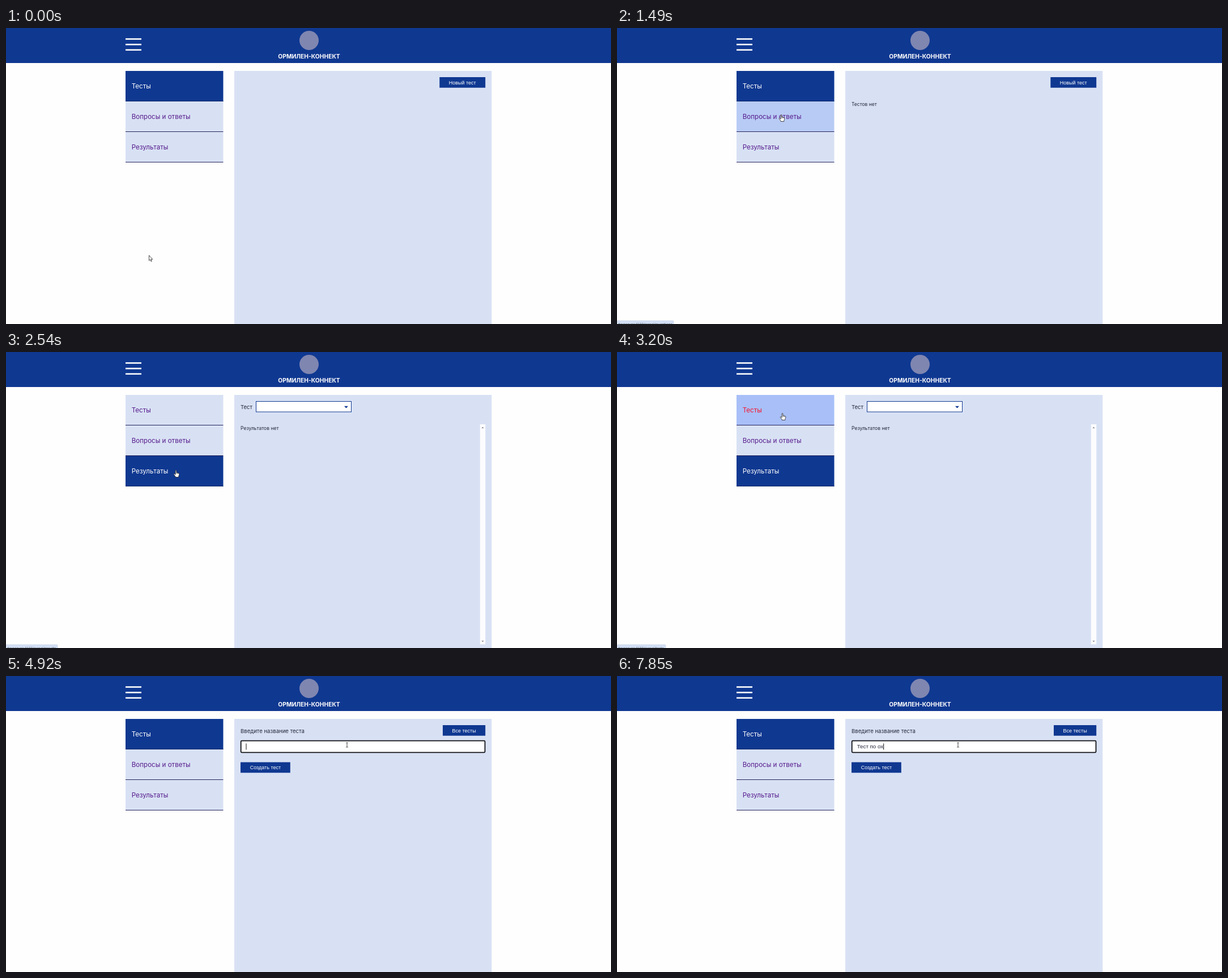
These frames come from a looping animation (1068 by 524 pixels, 8000 ms). An HTML page:

```html
<!DOCTYPE html>
<html lang="ru">
<head>
<meta charset="utf-8">
<title>Тесты</title>
<style>
  html, body { margin: 0; width: 100%; height: 100%; overflow: hidden; background: #fefefe; }
  svg { display: block; }
  text { font-family: Inter, "Open Sans", sans-serif; fill: #23253a; white-space: pre; }
  .ui { font-family: "Liberation Sans", Arial, sans-serif; }
</style>
</head>
<body>
<svg id="stage" width="1068" height="524" viewBox="0 0 1068 524"></svg>
<script>
const NAVY = '#0f3891', PALE = '#d8e1f4', HOVER = '#a8bff8', LINE = '#25235a';
const LOOP = 8000;
const MENU = ['Тесты', 'Вопросы и ответы', 'Результаты'];
const LINKS = [['tests', 86], ['questions', 100], ['results', 91]];
const PAGES = { tests: 0, questions: 1, results: 2, form: 0 };
const stage = document.getElementById('stage');

// time, page, pointer, pointer x, pointer y, details
const STEPS = [
  [0, 'tests', 'arrow', 252, 402, { loading: true }],
  [430, 'tests', 'arrow', 258, 378, { loading: true }],
  [640, 'tests', 'arrow', 276, 284, { loading: true }],
  [850, 'tests', 'hand', 289, 168, { loading: true, link: 1, tint: '#d0dbf4' }],
  [1070, 'tests', 'hand', 292, 110, { loading: true, link: 0 }],
  [1280, 'tests', 'hand', 292, 108, { link: 0 }],
  [1490, 'tests', 'hand', 290, 153, { link: 1, tint: '#b8cbf5' }],
  [1700, 'questions', 'hand', 291, 155, { link: 1 }],
  [1910, 'questions', 'hand', 300, 209, { link: 2, tint: '#d0dbf4' }],
  [2120, 'questions', 'hand', 300, 209, { link: 2, tint: HOVER }],
  [2540, 'results', 'hand', 300, 209, { link: 2 }],
  [2760, 'results', 'hand', 297, 165, { link: 1, tint: '#c6d4f5' }],
  [2980, 'results', 'hand', 293, 111, { link: 0, tint: '#c0d0f6' }],
  [3200, 'results', 'hand', 292, 108, { link: 0, tint: HOVER, pressed: true }],
  [3420, 'tests', 'hand', 292, 108, { link: 0 }],
  [3630, 'tests', 'arrow', 455, 84, {}],
  [3850, 'tests', 'arrow', 735, 62, {}],
  [4080, 'tests', 'hand', 819, 92, { buttonHot: true }],
  [4290, 'form', 'hand', 816, 93, { buttonHot: true }],
  [4500, 'form', 'beam', 602, 122, {}],
  [4710, 'form', 'beam', 602, 122, { focus: 1.3 }],
  [4920, 'form', 'beam', 602, 122, { focus: 1.8, caret: true }],
  [5350, 'form', 'beam', 602, 122, { focus: 1.8 }],
  ...[[5760, 1], [5970, 2], [6180, 3], [6390, 4], [6590, 5], [6790, 6], [6990, 8], [7420, 9], [7850, 10]]
    .map(([t, n]) => [t, 'form', 'beam', 602, 122,
      { focus: 1.8, caret: true, typed: 'Тест по ох'.slice(0, n) }])
];

const rect = (x, y, w, h, fill, more = '') =>
  `<rect x="${x}" y="${y}" width="${w}" height="${h}" fill="${fill}" ${more}/>`;
const path = (d, fill, more = '') => `<path d="${d}" fill="${fill}" ${more}/>`;
const text = (x, y, size, str, more = '') =>
  `<text x="${x}" y="${y}" font-size="${size}" ${more}>${str}</text>`;
const button = (x, y, w, str, hot) => rect(x, y, w, 18.7, hot ? '#2358b9' : NAVY) +
  text(x + w / 2, y + 12.5, 9, str, 'class="ui" text-anchor="middle" style="fill:#fff"');

const POINTERS = {
  arrow: path('M.5 .5V9.8L2.6 7.9 4 11.3 5.4 10.7 4 7.4H6.8Z', '#fff', 'stroke="#222" stroke-width=".8"'),
  hand: path('M-.9 1Q0 -.4.9 1V4.6L2.5 4.8 4 5.2 5.3 5.9Q6 6.2 5.8 8.2L4.8 10.5V12.5H-.9V11.4L-3.7 7.7Q-4 6.4-2.7 6.6L-.9 8.2Z',
    '#fff', 'stroke="#222" stroke-width=".8" stroke-linejoin="round"') +
    path('M.9 4.6V7M2.6 5V7M4.2 5.4V7', 'none', 'stroke="#222" stroke-width=".5"'),
  beam: path('M-2 -4H-.5L0 -3.5 .5 -4H2M0 -3.5V3.5M-2 4H-.5L0 3.5 .5 4H2', 'none', 'stroke="#333" stroke-width=".9"')
};

function header() {
  return rect(0, 0, 1068, 62, NAVY) +
    [18.2, 27.9, 37.5].map(y => rect(211, y, 28, 2.6, '#fff')).join('') +
    '<circle cx="535" cy="22" r="17" fill="#7f86b0"/>' +
    text(535, 54, 10.3, 'ОРМИЛЕН-КОННЕКТ', 'text-anchor="middle" font-weight="700" style="fill:#fff"');
}

function menu(active, { link, tint, pressed }) {
  return MENU.map((label, i) => {
    const y = 76 + 54 * i, on = i === active, hot = i === link;
    const ink = on ? '#fff' : hot && pressed ? '#f5142d' : '#551a8b';
    return rect(211, y, 172.5, 54, on ? NAVY : hot && tint || PALE) +
      rect(211, y + 53, 172.5, 1, on ? '#0c2669' : LINE) +
      text(221.7, y + 31, 11.6, label, `style="fill:${ink}"`);
  }).join('');
}

const select = () => text(414, 100.5, 9.6, 'Тест') +
  rect(441.5, 87.5, 168, 18.5, '#fff', `stroke="${NAVY}"`) +
  path('M597 95.7H604L600.5 99.5Z', NAVY);

const CONTENT = {
  tests: o => button(765.3, 87, 80.9, 'Новый тест', o.buttonHot) +
    (o.loading ? '' : text(414, 137.5, 8.5, 'Тестов нет')),
  questions: () => select() + button(753.5, 87.5, 92.7, 'Новый вопрос') +
    text(414, 129.8, 8.5, 'Вопросов нет'),
  results: () => select() + text(414, 138, 8.55, 'Результатов нет') +
    rect(836.8, 128, 9.4, 389.5, '#fcfcfe') +
    path('M839.4 135H843.6L841.5 132.5ZM839.4 511H843.6L841.5 513.5Z', '#8b8d94'),
  form: o => text(414, 100.5, 9.6, 'Введите название теста') +
    button(771, 87, 75.2, 'Все тесты', o.buttonHot) +
    rect(414.7, 114.7, 430.8, 20.6, '#fff',
      `rx="${o.focus ? 1.5 : 0}" stroke="${o.focus ? '#101014' : NAVY}" stroke-width="${o.focus || 1}"`) +
    text(423.7, 128, 9.75, o.typed || '', 'class="ui" id="typed"') +
    (o.caret ? rect(423.5, 119.5, 1, 11, '#111', 'id="caret"') : '') +
    button(414, 152.6, 87.8, 'Создать тест')
};

function status(link) {
  if (link === undefined) return '';
  const [name, width] = LINKS[link];
  return rect(-2, 518, width + 2, 10, '#d3dff3', 'rx="1.5" stroke="#c3cde0" stroke-width=".5"') +
    text(1.5, 526.5, 6.4, 'devserver:4100/panel/' + name, 'style="font-family:\'Open Sans\',sans-serif;fill:#555c6b"');
}

function draw([, page, pointer, x, y, o]) {
  stage.innerHTML = rect(0, 0, 1068, 524, '#fefefe') + header() + menu(PAGES[page], o) +
    rect(403, 76, 454.3, 448, PALE) + CONTENT[page](o) + status(o.link) +
    `<g transform="translate(${x} ${y})">${POINTERS[pointer]}</g>`;
  const caret = document.getElementById('caret');
  if (caret && o.typed) {
    caret.setAttribute('x', 423.7 + document.getElementById('typed').getComputedTextLength());
  }
}

let shown;
function tick() {
  const t = (performance.now() - start) % LOOP;
  const step = STEPS.findLast(s => s[0] <= t);
  if (step !== shown) draw(shown = step);
  requestAnimationFrame(tick);
}
const start = performance.now();
tick();
</script>
</body>
</html>
```
